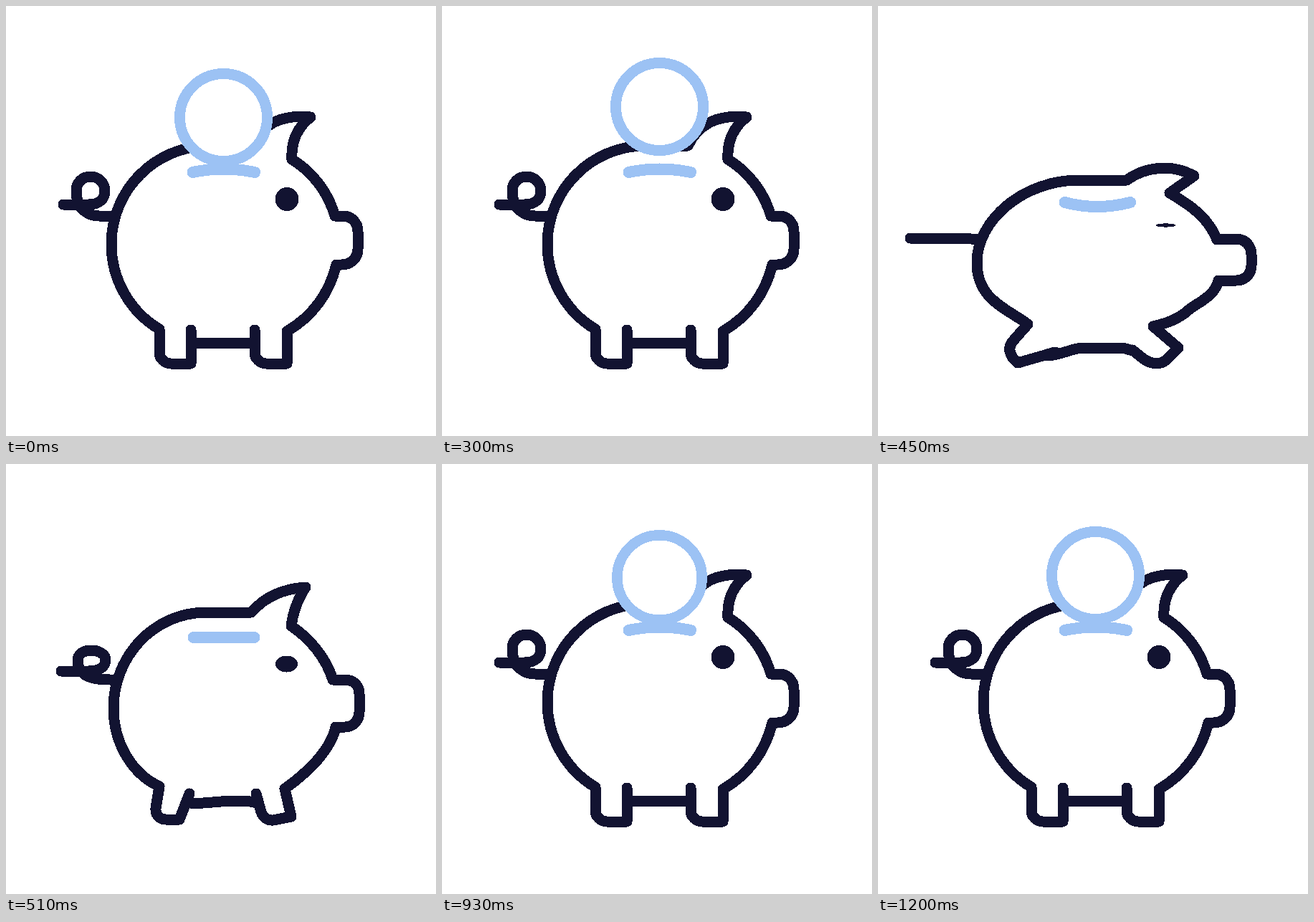
An HTML page for the animation above (3260 ms loop, 600x600 px).

```html
<!DOCTYPE html>
<html lang="en">
<head>
<meta charset="utf-8">
<title>Piggy bank</title>
<style>
html, body { margin: 0; width: 100%; height: 100%; overflow: hidden; background: #fff; }
svg { display: block; width: 100%; height: 100%; shape-rendering: crispEdges; }
path, circle { fill: none; stroke: #121331; stroke-width: 15; stroke-linecap: round; stroke-linejoin: round; }
ellipse { fill: #121331; }
#coin, #slot { stroke: #9cc2f4; }
#coin { fill: #fff; }
#slot { stroke-width: 16; }
</style>
</head>
<body>
<svg viewBox="0 0 600 600">
  <path id="tail"/>
  <path id="body"/>
  <path id="ear"/>
  <ellipse id="eye"/>
  <circle id="coin" r="61"/>
  <path id="slot"/>
</svg>
<script>
const LOOP = 3260, STEP = 30;
const $ = id => document.getElementById(id);

const linear = u => u;
const easeIn = u => u * u;
const easeOut = u => u * (2 - u);
const smooth = u => (1 - Math.cos(Math.PI * u)) / 2;

// Poses of one part share their commands, so their numbers can be blended.
const body = {
  rest: `M343 195 L284 195 C208 195 147 257 147 332 C147 383 174 427 214 451
    L214 484 C214 492 222 499 230 499 L258 499 L258 452
    M265 470 C275 470 290 470 300 470 L325 470 C332 470 339 470 346 470
    M347 452 L347 484 C347 492 355 499 363 499 L392 499 L392 454
    C409 444 424 431 436 415 C448 399 456 381 461 361 L468 361 C481 361 491 352 491 339
    L491 315 C491 302 482 293 470 293 L459 293 C449 259 427 231 399 214`,
  squash: `M347 243 L280 243 C204 243 138 298 138 358 C138 410 180 422 209 444
    L187 469 C181 478 183 488 195 498 L247 483 L247 483
    M237 488 C255 487 270 478 285 477 L335 477 C345 477 350 479 355 481
    M355 480 L370 492 C380 499 393 502 402 494 L419 477 L384 447
    C402 443 418 437 430 427 C442 415 470 407 475 383 L500 383 C512 383 521 374 521 362
    L521 347 C521 334 512 325 499 325 L473 326 C462 298 440 280 407 261`,
  rebound: `M342 207 L280 207 C205 207 150 270 150 340 C150 390 176 432 214 450
    L209 480 C208 490 215 496 223 496 L242 496 L256 460
    M261 474 C275 473 290 472 300 471 L325 470 C334 470 343 471 350 473
    M349 460 L355 482 C357 491 363 498 373 497 L398 492 L389 453
    C402 444 418 431 432 416 C446 400 457 383 460 367 L473 367 C485 367 493 357 493 346
    L493 321 C493 309 485 301 472 301 L456 301 C447 272 426 245 398 226`
};

const ear = {
  rest: 'M343 195 C358 165 383 151 425 155 C404 171 398 193 399 214',
  squash: 'M347 243 C373 224 411 220 441 237 C430 245 418 253 407 261',
  rebound: 'M342 207 C360 187 386 174 418 172 C407 188 400 209 398 226',
  settle: 'M343 195 C356 168 383 155 427 160 C406 176 398 196 399 214'
};

const tail = {
  rest: `M150 293 L130 293 C118 293 108 287 103 279 C99 272 98 265 98 258
    C98 246 107 238 118 238 C129 238 138 247 138 258 C138 270 129 277 115 277 L80 277`,
  squash: `M142 325 L130 325 C122 325 116 324 110 324 C106 324 103 324 100 324
    C98 324 96 324 94 324 C92 324 90 324 88 324 C84 324 80 324 76 324 L45 324`,
  rebound: `M153 301 L145 301 C125 301 110 297 105 289 C101 284 100 279 100 275
    C100 265 108 260 119 260 C130 260 139 266 139 273 C139 283 130 289 115 289 L77 289`,
  settle: `M150 293 L130 293 C118 293 108 288 103 280 C99 274 98 269 98 263
    C98 252 107 245 118 245 C129 245 138 253 138 262 C138 272 129 279 115 279 L80 279`
};

const slot = {
  rest: 'M260.5 232 Q303.5 223 347 232',
  squash: 'M260.5 274 Q306 286 352 274',
  rebound: 'M261.5 242 Q304 242 346.5 242'
};

// Centre and radii
const eye = {
  rest: '392 269.5 16.5 16.5',
  squash: '401.5 306 14 2.6',
  rebound: '391.5 279 15.5 11.5'
};

// Each key: time, pose, easing that leads to it
const firm = p => [
  [345, p.rest], [450, p.squash, smooth], [510, p.rebound, linear], [570, p.rest, easeOut]
];
const floppy = p => [
  [345, p.rest], [450, p.squash, smooth], [510, p.rebound, linear],
  [690, p.settle, easeOut], [740, p.rest, smooth]
];

// Height and scale
const coinKeys = [
  [0, '155.5 1'], [180, '101.5 1', smooth], [300, '140.5 1', easeIn],
  [330, '163 1', linear], [405, '257 0', linear],
  [825, '231 0', linear], [930, '158.5 .97', linear],
  [990, '128.5 1', easeOut], [1200, '155.5 1', smooth]
];

function blend(a, b, u) {
  const to = b.match(/[\d.]+/g);
  let i = 0;
  return a.replace(/[\d.]+/g, n => (+n + (to[i++] - n) * u).toFixed(3));
}

function at(keys, t) {
  const next = keys.findIndex(k => k[0] > t);
  if (next < 0) return keys[keys.length - 1][1];
  if (next === 0) return keys[0][1];
  const [t0, a] = keys[next - 1], [t1, b, ease] = keys[next];
  return blend(a, b, ease((t - t0) / (t1 - t0)));
}

const paths = [
  [$('body'), firm(body)], [$('slot'), firm(slot)],
  [$('ear'), floppy(ear)], [$('tail'), floppy(tail)]
];
const eyeKeys = firm(eye);

function draw(t) {
  for (const [el, keys] of paths) el.setAttribute('d', at(keys, t));
  const shape = at(eyeKeys, t).split(' ');
  ['cx', 'cy', 'rx', 'ry'].forEach((name, i) => $('eye').setAttribute(name, shape[i]));
  const [y, scale] = at(coinKeys, t).split(' ');
  $('coin').setAttribute('transform', `translate(303.5 ${y}) scale(${scale})`);
}

const start = performance.now();
function tick() {
  const t = (performance.now() - start) % LOOP;
  draw(Math.floor(t / STEP) * STEP);
  requestAnimationFrame(tick);
}
tick();
</script>
</body>
</html>
```
